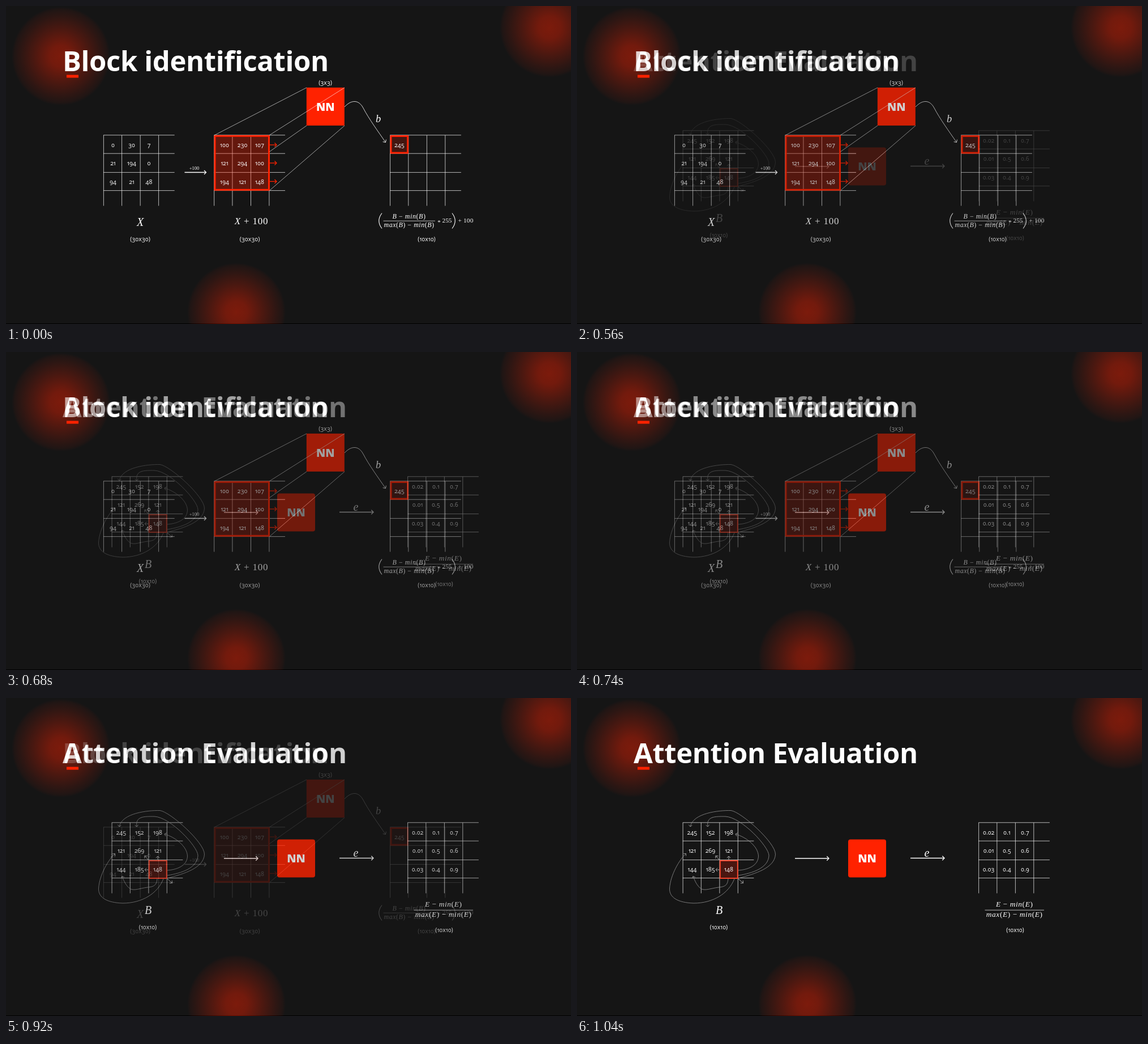
Recreate the animation shown at these times as an HTML page. Size 998x561 px, loop 8000 ms.

```html
<!DOCTYPE html>
<html lang="en">
<head>
<meta charset="utf-8">
<title>Block identification</title>
<style>
  html, body { margin: 0; width: 100%; height: 100%; overflow: hidden; background: #151515; }
  svg { position: absolute; left: 0; top: 0; width: 998px; height: 561px; }
  #fade { position: absolute; inset: 0; isolation: isolate; }
  #second { mix-blend-mode: plus-lighter; opacity: 0; }
  text { fill: #fff; text-anchor: middle; white-space: pre; }
  .sans { font: 400 10.5px "Open Sans", "Noto Sans", sans-serif; font-variant-numeric: oldstyle-nums proportional-nums; }
  .title { font: 700 49px "Open Sans", "Noto Sans", sans-serif; text-anchor: start; letter-spacing: -.38px; }
  .nn { font: 800 19.5px "Open Sans", "Noto Sans", sans-serif; }
  .math { font-family: "Liberation Serif", "Noto Serif", serif; }
  .math tspan { font-style: italic; }
  path { fill: none; stroke: #fff; }
</style>
</head>
<body>
<svg id="back" viewBox="0 0 998 561">
  <defs>
    <radialGradient id="glow">
      <stop offset="0" stop-color="#ff2200" stop-opacity=".44"/>
      <stop offset="0.22" stop-color="#ff2200" stop-opacity=".4"/>
      <stop offset="0.55" stop-color="#ff2200" stop-opacity=".23"/>
      <stop offset="0.8" stop-color="#ff2200" stop-opacity=".11"/>
      <stop offset="0.94" stop-color="#ff2200" stop-opacity=".05"/>
      <stop offset="1" stop-color="#ff2200" stop-opacity="0"/>
    </radialGradient>
  </defs>
  <rect y="560" width="998" height="1"/>
  <g fill="url(#glow)">
    <circle cx="97" cy="88.5" r="87"/>
    <circle cx="960" cy="38" r="88"/>
    <circle cx="407" cy="540" r="87"/>
  </g>
  <rect x="107" y="121.5" width="21" height="5" fill="#ff2200"/>
</svg>
<div id="fade">
  <svg id="first" viewBox="0 0 998 561"></svg>
  <svg id="second" viewBox="0 0 998 561"></svg>
</div>
<script>
const RED = '#ff2200', GREY = '#929292';
const $ = id => document.getElementById(id);

const text = (cls, x, y, str) => `<text class="${cls}" x="${x}" y="${y}">${str}</text>`;
const label = (x, y, str) => text('sans', x, y, str);
const path = (d, color = '#fff', width = .7) =>
  `<path d="${d}" style="stroke:${color};stroke-width:${width}"/>`;
const box = (x, y, w, h, attrs) => `<rect x="${x}" y="${y}" width="${w}" height="${h}" ${attrs}/>`;

// Letters are italic, digits and signs upright
const math = (x, y, size, str, gap = 0) =>
  `<text class="math" x="${x}" y="${y}" font-size="${size}" letter-spacing="${gap}">` +
  str.replace(/[A-Za-z]+/g, '<tspan>$&</tspan>') + '</text>';

// Open arrow head with its tip at x, y
const head = (x, y, angle, size, color, width) =>
  `<g transform="translate(${x} ${y}) rotate(${angle})">` +
  path(`M${-size} ${-size}L0 0L${-size} ${size}`, color, width) + '</g>';

const arrow = (x1, y1, x2, y2, size, color, width) =>
  path(`M${x1} ${y1}L${x2} ${y2}`, color, width) +
  head(x2, y2, Math.atan2(y2 - y1, x2 - x1) * 180 / Math.PI, size, color, width);

const COLS = [0.4, 32.6, 65.2, 97.6], ROWS = [-0.2, 32.2, 65.6, 97.6];
const grid = (x, y) =>
  COLS.map(c => path(`M${x + c} ${y}v124.5`)).join('') +
  ROWS.map(r => path(`M${x} ${y + r}h125.7`)).join('');

const cells = (xs, y, rows) => rows.map((row, j) =>
  row.split(' ').map((n, i) => label(xs[i], y + [21, 52.8, 85.6][j], n)).join('')).join('');

const net = (x, y, round, lines = '') =>
  box(x, y, 67, 67, `rx="${round}" fill="${RED}"`) + lines + text('nn', x + 33.4, y + 40.8, 'NN');

const frame = alpha => `fill="${RED}" fill-opacity="${alpha}" stroke="${RED}" stroke-width="3"`;

const rays = path('M368 228L531 144M465 228L598 144M465.5 257L531 211M465.5 325.5L598 211', '#fff', .6);

$('first').innerHTML = [
  text('title', 100, 115, 'Block identification'),
  grid(172, 228),
  cells([189, 222, 252.5], 228, ['0 30 7', '21 194 0', '94 21 48']),
  math(332.5, 289, 8.5, '+100'),
  arrow(315.5, 293.5, 353.5, 293.5, 3.5, '#fff', 1.3),

  grid(367.3, 228),
  box(369, 229.3, 95.5, 95, frame(.34)),
  cells([386, 417.7, 448], 228, ['100 230 107', '121 294 100', '194 121 148']),
  [245, 277, 309.5].map(y => arrow(465.5, y, 478, y, 3.5, RED, 1.3)).join(''),

  net(530.8, 143.9, 0, rays),
  label(564, 138.5, '(3x3)'),
  path('M598 178C608 167 622 163 631 180C641 199 657 221 670.5 240.5', '#fff', .8),
  head(670.5, 240.5, 56, 3.5, '#fff', .8),
  math(657.5, 204.5, 18.5, 'b'),

  grid(678.2, 228),
  box(680, 229.5, 29.6, 29.6, frame(.2)),
  label(695, 248.5, '245'),

  math(237, 388, 20, 'X'),
  math(433.5, 385.3, 17, 'X + 100', .8),
  label(237, 415, '(30x30)'),
  label(430.5, 415, '(30x30)'),
  label(743, 415, '(10x10)'),
  path('M664 365.5Q653.5 379 664 392.5M788 365.5Q798.5 379 788 392.5', '#fff', 1.1),
  math(712, 374.5, 12, 'B − min(B)', .55),
  path('M666.5 379.2H758'),
  math(712, 390.3, 12, 'max(B) − min(B)', .5),
  math(765, 384.5, 11, '*'),
  math(779, 382.3, 11.3, '255'),
  math(812, 382.3, 11.3, '+ 100', .2)
].join('');

// Curved links: path, then tip position and direction
const links = [
  ['M285 318C315 310 349 300 350.5 276C351 255 290 201 272 198.5C250 198 205 203 200 227', 200, 227, 98],
  ['M285 313C310 309 338 300 339 278C339 262 290 210 262 209C245 209 228 208 231 227', 231, 227, 84],
  ['M285 304C300 303 320 297 320.5 279C320 262 300 246 280 240', 280, 240, 197],
  ['M278 319C268 345 240 362 206 362C178 361 163 352 163.5 336C165 312 181 285 192.5 274.5', 192.5, 274.5, -45],
  ['M267 319C266 330 262 333 250 334C235 336 228 340 220 337C212 332 208 322 205 314.5', 205, 314.5, -112]
];
const steps = [[252, 286, 245, 278.5], [268, 287, 268, 279], [252, 303, 245, 303], [285, 319, 293.5, 326.5]];

$('second').innerHTML = [
  text('title', 100, 115, 'Attention Evaluation'),
  grid(186.7, 220),
  links.map(([d, x, y, a]) => path(d, GREY, .8) + head(x, y, a, 3, GREY, .9)).join(''),
  steps.map(s => arrow(...s, 3.2, '#a5a5a5', 1)).join(''),
  box(252.8, 287, 31, 31, 'fill="#4a1610" stroke="#f0432b" stroke-width="2"'),
  cells([203.5, 235.7, 268], 220, ['245 152 198', '121 269 121', '144 185 148']),
  math(251, 380.7, 20, 'B'),
  label(250.5, 407.5, '(10x10)'),

  arrow(385, 283, 445, 283, 3.7, '#fff', 1.3),
  net(479, 249.5, 4),
  arrow(589, 282.5, 649, 282.5, 3.7, '#fff', 1.3),
  math(618, 280, 20, 'e'),

  grid(709.2, 220),
  cells([727, 759.3, 791.5], 220, ['0.02 0.1 0.7', '0.01 0.5 0.6', '0.03 0.4 0.9']),
  math(772.7, 368.3, 13.4, 'E − min(E)', .6),
  path('M720.5 374.2H825'),
  math(772.7, 386.3, 13.4, 'max(E) − min(E)', .6),
  label(774, 413, '(10x10)')
].join('');

// Ten-step cross-fade inside an eight-second loop
const LOOP = 8000, START = 500, LENGTH = 600;
const fade = (id, from, to) => $(id).animate([
  { opacity: from, offset: 0 },
  { opacity: from, offset: START / LOOP, easing: 'steps(10, jump-start)' },
  { opacity: to, offset: (START + LENGTH) / LOOP },
  { opacity: to, offset: 1 }
], { duration: LOOP, iterations: Infinity }).startTime = 0;
fade('first', 1, 0);
fade('second', 0, 1);
</script>
</body>
</html>
```
